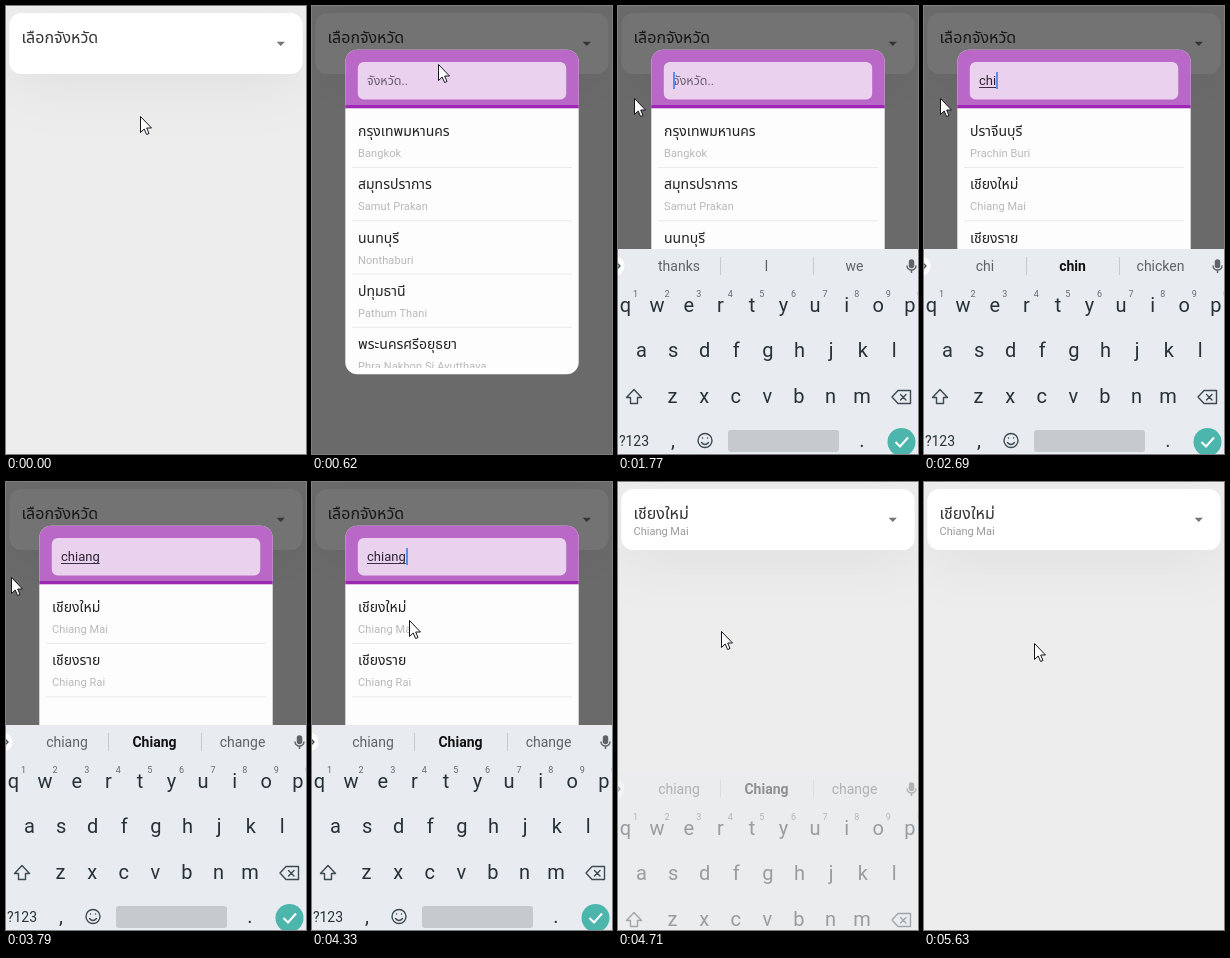
Recreate the animation shown at these times as an HTML page. Size 300 px wide and 448 px high, loop 6.03 s.

```html
<!DOCTYPE html>
<html lang="th">
<head>
<meta charset="utf-8">
<title>Province picker</title>
<style>
  html, body { margin: 0; width: 100%; height: 100%; overflow: hidden; background: #ededed; }
  svg { display: block; width: 300px; height: 448px; }
  text { font-family: Roboto, "Noto Sans Thai", "Noto Sans", sans-serif; white-space: pre; }
  .mid { text-anchor: middle; }
  .title { font-size: 14px; fill: #212121; font-family: "Noto Sans Thai UI", "Noto Sans Thai", "Noto Sans", sans-serif; }
  .sub { font-size: 11px; letter-spacing: .1px; fill: #b8b8b8; }
  .key { font-size: 20px; fill: #263238; }
  .num { font-size: 9px; fill: #5f6b73; }
  .sug { font-size: 14px; fill: #5f6368; }
  .line { fill: none; stroke: #3c4a52; stroke-width: 1.4; stroke-linejoin: round; stroke-linecap: round; }
  #choice { font-family: Roboto, "Noto Sans Thai Looped", "Noto Sans Thai", "Noto Sans", sans-serif; }
  #card { filter: drop-shadow(0 14px 28px rgba(0, 0, 0, .05)); }
</style>
</head>
<body>
<svg viewBox="0 0 300 448">
  <defs>
    <clipPath id="box"><rect x="33.300" y="43.700" width="233.400" height="324.600" rx="12"/></clipPath>
    <clipPath id="body"><rect x="34" y="102" width="232" height="260"/></clipPath>
    <clipPath id="cardClip"><rect x="3.300" y="7" width="293.300" height="61" rx="12"/></clipPath>
  </defs>
  <rect width="300" height="448" fill="#ededed"/>
  <rect id="card" x="3.300" y="7" width="293.300" height="61" rx="12" fill="#fff"/>
  <circle id="ripple" cx="126" cy="58" r="12" fill="#000" opacity=".08" clip-path="url(#cardClip)"/>
  <text id="choice" x="15.500" y="36.500" font-size="16" fill="#333"></text>
  <text id="choiceSub" x="15.500" y="53" font-size="11" fill="#9a9a9a"></text>
  <path d="M270.600 35.800h8.300l-4.150 4.200z" fill="#757575"/>

  <rect id="shade" width="300" height="448"/>
  <g id="dialog">
    <g clip-path="url(#box)">
      <rect x="33" y="43" width="234" height="326" fill="#fdfdfd"/>
      <rect x="33" y="43" width="234" height="56" fill="#ba68c8"/>
      <rect x="33" y="99" width="234" height="3.300" fill="#9c27b0"/>
    </g>
    <rect x="45.800" y="56" width="208.400" height="37.500" rx="6" fill="#ead2ee"/>
    <text id="hint" x="55" y="79" font-size="12.500" fill="#6a5c6d">จังหวัด..</text>
    <text id="typed" x="55" y="79" font-size="13" fill="#2b2430"></text>
    <rect id="under" x="55" y="81" height="1" fill="#3a3040"/>
    <rect id="caret" y="66" width="2" height="17" fill="#5b8cf0"/>
    <g id="list" clip-path="url(#body)"></g>
  </g>

  <g id="board">
    <rect y="243" width="300" height="400" fill="#e8ecf0"/>
    <circle cx="-3" cy="260" r="9.500" fill="#fff"/>
    <path class="line" d="M-1 257l3 3l-3 3"/>
    <path d="M102.500 251v18M195.500 251v18" stroke="#c3c9ce"/>
    <g fill="none" stroke="#5f6368" stroke-width="1.500">
      <rect x="291.500" y="254" width="4" height="7.500" rx="2" fill="#5f6368"/>
      <path d="M289 259.500a4.500 4.500 0 0 0 9 0M293.500 264v3"/>
    </g>
    <g id="keys"></g>
    <path class="line" d="M16 383.500l-7.500 8h4v6h7v-6h4z"/>
    <path class="line" d="M280 384.500h12.500v13h-12.500l-6-6.500zM282.500 388.500l5.500 5.500m0-5.500l-5.500 5.500"/>
    <circle class="line" cx="87" cy="434.500" r="7"/>
    <path class="line" d="M83.500 436.500q3.500 4 7 0M84.500 432h.1M89.500 432h.1"/>
    <rect x="110" y="424" width="111" height="22" rx="3" fill="#c6cacd"/>
    <circle cx="283.500" cy="436" r="14" fill="#4db6ac"/>
    <path d="M277.500 436l4.500 4.500l8-9" fill="none" stroke="#fff" stroke-width="2"/>
  </g>

  <path id="mouse" d="M.5 .5V16.500L4.200 13L6.600 18.500L9 17.500L6.700 12H11.500Z" fill="#fff" stroke="#151520"/>
</svg>
<script>
const LOOP = 6030;
const $ = id => document.getElementById(id);

// [first, last, count] of the moments at which the picture advances
const SPANS = [
  [0, 0, 1], [70, 450, 6], [620, 620, 1], [920, 1080, 3], [1230, 1770, 8],
  [1850, 1850, 1], [2150, 2390, 4], [2690, 2690, 1], [2860, 2860, 1],
  [3010, 3010, 1], [3240, 3240, 1], [3790, 4330, 8], [4410, 4940, 8],
  [5020, 5020, 1], [5630, 5630, 1]
];
const TICKS = SPANS.flatMap(([a, b, n]) =>
  Array.from({ length: n }, (_, i) => n < 2 ? a : Math.floor((a + (b - a) * i / (n - 1)) / 10) * 10));

// [time, x, y]
const PATH = [
  [0, 134, 110], [370, 126, 58], [850, 126, 58], [1080, 118, 76], [1390, 118, 76],
  [1770, 16, 92], [3710, 16, 92], [3790, 5, 95], [4330, 97, 138], [4480, 97, 138],
  [4940, 108, 159], [5020, 109, 160], [5550, 109, 160], [5630, 110, 161]
];

// [time, typed text, suggestions]
const TYPING = [
  [0, "", "thanks", "I", "we"],
  [2150, "c", "thanks", "I", "we"],
  [2230, "c", "c", "can", "call"],
  [2310, "ch", "c", "can", "call"],
  [2390, "ch", "ch", "check", "Christmas"],
  [2690, "chi", "chi", "chin", "chicken"],
  [2860, "chia", "chia", "China", "chain"],
  [3010, "chian", "chian", "Chiang", "chain"],
  [3240, "chiang", "chiang", "Chiang", "change"]
];

const PLACES = [
  ["กรุงเทพมหานคร", "Bangkok"], ["สมุทรปราการ", "Samut Prakan"], ["นนทบุรี", "Nonthaburi"],
  ["ปทุมธานี", "Pathum Thani"], ["พระนครศรีอยุธยา", "Phra Nakhon Si Ayutthaya"],
  ["ชัยนาท", "Chai Nat"], ["ชลบุรี", "Chon Buri"], ["จันทบุรี", "Chanthaburi"],
  ["ฉะเชิงเทรา", "Chachoengsao"], ["ปราจีนบุรี", "Prachin Buri"],
  ["เชียงใหม่", "Chiang Mai"], ["เชียงราย", "Chiang Rai"]
];

function add(parent, tag, attrs, text = "") {
  const el = document.createElementNS("http://www.w3.org/2000/svg", tag);
  for (const k in attrs) el.setAttribute(k, attrs[k]);
  el.textContent = text;
  return parent.appendChild(el);
}

const label = (cls, x, y, text = "") => add($("keys"), "text", { class: cls + " mid", x, y }, text);

[["qwertyuiop", 7.5, 306], ["asdfghjkl", 23.5, 351], ["zxcvbnm", 54.5, 397]].forEach(([row, x, y], r) =>
  [...row].forEach((ch, i) => {
    label("key", x + i * 31.6, y, ch);
    if (!r) label("num", x + 10 + i * 31.6, 291, (i + 1) % 10);
  }));
label("key", 55, 441, ",");
label("key", 244, 441, ".");
label("key", 16, 440, "?123").style.fontSize = "14px";
const sugs = [61, 148.5, 236.5].map(x => label("sug", x, 265));

const rows = Array.from({ length: 5 }, (_, i) => {
  const g = add($("list"), "g", { transform: `translate(0 ${i * 53.3})` });
  return {
    g,
    title: add(g, "text", { class: "title", x: 46, y: 130 }),
    sub: add(g, "text", { class: "sub", x: 46, y: 151 }),
    line: add(g, "rect", { x: 40, y: 161, width: 220, height: 1, fill: "#ececec" })
  };
});

const clamp = v => Math.max(0, Math.min(1, v));
const within = (t, a, b) => t >= a && t < b;
const latest = (list, t, key) => list.reduce((best, e) => key(e) <= t ? e : best);

function along(t) {
  const n = PATH.findIndex(p => p[0] > t);
  if (n < 0) return PATH[PATH.length - 1].slice(1);
  const [a, b] = [PATH[n - 1], PATH[n]];
  const k = (t - a[0]) / (b[0] - a[0]);
  return [1, 2].map(i => Math.round(a[i] + (b[i] - a[i]) * k));
}

function showTyping([, word, ...hints]) {
  $("typed").textContent = word;
  $("hint").style.display = word ? "none" : "";
  const w = word ? $("typed").getComputedTextLength() : 0;
  $("under").setAttribute("width", w);
  $("caret").setAttribute("x", 55 + Math.round(w));
  hints.forEach((h, i) => {
    sugs[i].textContent = h;
    const strong = i === 1 && word && h !== "I";
    sugs[i].style.fontWeight = strong ? 700 : 400;
    sugs[i].style.fill = strong ? "#111" : "";
  });
  const found = PLACES.filter(p => p[1].toLowerCase().includes(word));
  rows.forEach((r, i) => {
    r.g.style.display = found[i] ? "" : "none";
    if (found[i]) [r.title.textContent, r.sub.textContent] = found[i];
  });
}

// [distance below its place, opacity]
function keyboard(t) {
  if (t < 4480) {
    const p = clamp((t - 1230) / 390);
    return [142 * (1 - p) ** 2, clamp(p * 1.4)];
  }
  const p = clamp((t - 4480) / 400);
  return [142 * p * p, 1 - p];
}

let last = -1;
function draw(now) {
  requestAnimationFrame(draw);
  const t = latest(TICKS, now % LOOP, e => e);
  if (t === last) return;
  last = t;

  const [x, y] = along(t);
  $("mouse").setAttribute("transform", `translate(${x} ${y})`);
  $("ripple").style.display = within(t, 450, 620) ? "" : "none";

  const picked = t >= 4410;
  $("choice").textContent = picked ? "เชียงใหม่" : "เลือกจังหวัด";
  $("choiceSub").textContent = picked ? "Chiang Mai" : "";

  const open = t < 620 ? 0 : clamp(1 - (t - 4400) / 195);
  $("dialog").style.opacity = open;
  $("shade").style.opacity = .55 * open ** .8;

  showTyping(latest(TYPING, t, e => e[0]));
  $("caret").style.display = within(t, 1230, 1850) || within(t, 2150, 3790) || t >= 4330 ? "" : "none";

  const [drop, alpha] = keyboard(t);
  $("board").setAttribute("transform", `translate(0 ${drop})`);
  $("board").style.opacity = alpha;
}
draw(performance.now());
</script>
</body>
</html>
```
